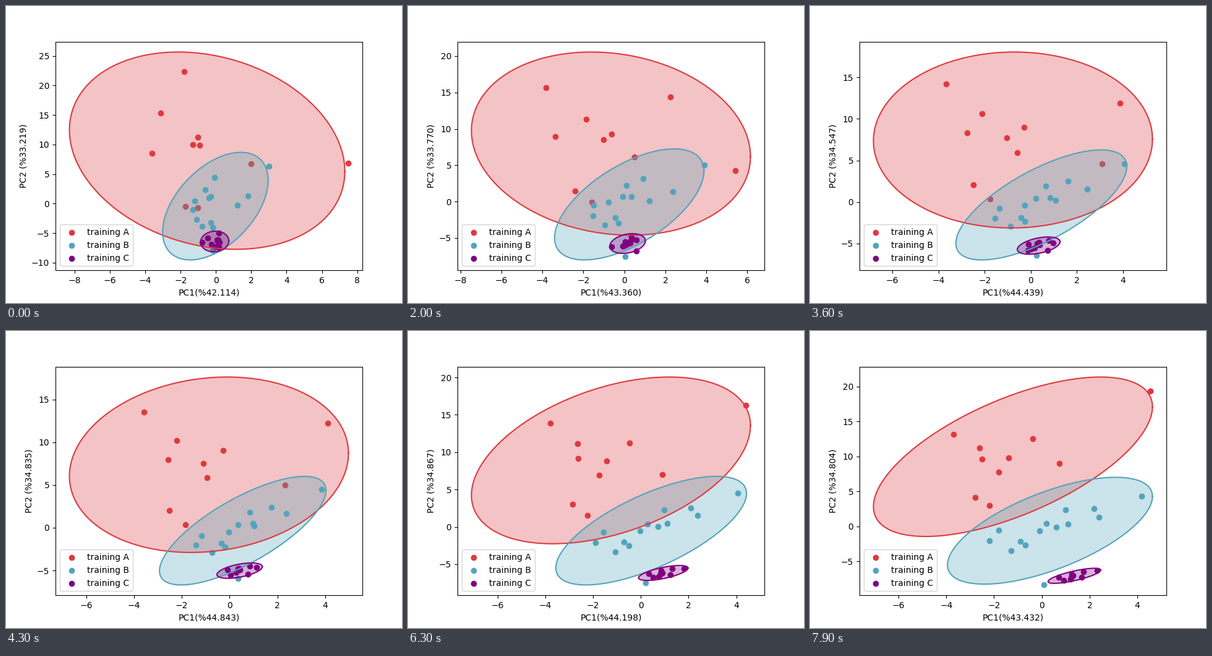
A matplotlib script that plays this animation: 640 px wide and 480 px high, repeating every 8000 ms.

```python
import numpy as np
import matplotlib.pyplot as plt
from matplotlib.animation import FuncAnimation

FRAMES, STEP = 80, 100
SCALE = np.sqrt(5.991)  # 95 % quantile of chi-square, 2 dof
KEYS = np.array([0, 1000, 2900, 4300, 5000, 6300, 7900])


def curve(*values):
    """Straight lines through 3, 4 or 7 values spread over the key times."""
    keys = KEYS[::6 // (len(values) - 1)]
    return lambda ms: np.interp(ms, keys, values)


def whiten(pts):
    """Shift and shear a cloud to zero mean and unit covariance."""
    root = np.linalg.cholesky(np.cov(pts.T))
    return (pts - pts.mean(0)) @ np.linalg.inv(root).T


def morph(start, end):
    """Cloud that glides from one arrangement to another, easing out."""
    start, end = whiten(np.array(start)), whiten(np.array(end))
    return lambda ms: whiten(end + (start - end) * (1 - ms / KEYS[-1]) ** 2)


class Group:
    """A cloud of points kept inside a moving confidence ellipse."""

    def __init__(self, name, color, cloud, x, y, width, height, lean):
        self.name, self.color, self.cloud = name, color, cloud
        self.curves = x, y, width, height, lean

    def draw(self, ax, ms):
        x, y, w, h, lean = (c(ms) for c in self.curves)
        shape = np.array([[w, 0], [h * lean, h * np.sqrt(1 - lean ** 2)]])
        place = lambda unit: (unit @ shape.T + (x, y)).T
        a = np.linspace(0, 2 * np.pi, 200)
        outline = place(np.column_stack([np.cos(a), np.sin(a)]))
        ax.scatter(*place(self.cloud(ms) / SCALE), color=self.color,
                   label=self.name)
        ax.plot(*outline, color=self.color)
        ax.fill(*outline, facecolor=self.color, alpha=0.3)


cloud_a = morph(
    [(-1.8, 22.3), (-3.1, 15.3), (-3.6, 8.5), (-1, 11.2), (-1.3, 10),
     (-0.9, 9.8), (2, 6.6), (7.5, 6.6), (-1.7, -0.5), (-1, -0.7)],
    [(4.5, 19.3), (-3.7, 13.1), (-2.5, 9.6), (-2.6, 11.2), (-0.4, 12.5),
     (-1.4, 9.8), (-1.8, 7.8), (0.7, 9), (-2.8, 4.1), (-2.2, 3)])

cloud_b = morph(
    [(3, 6.3), (-0.1, 4.4), (-0.6, 2.3), (-0.3, 1.2), (-0.4, 1),
     (-1.2, 0.4), (1.2, -0.2), (-1.3, -1), (-1.1, -2.7), (-0.3, -3.1),
     (-0.8, -3.8), (-0.2, -4), (1.8, 1.3), (-0.2, -7.8)],
    [(4.2, 4.3), (2.2, 2.5), (1, 2.4), (1.1, 0.3), (0.2, 0.4),
     (-0.1, -0.6), (0.6, -0.1), (-1.8, -0.5), (-2.2, -2), (-0.9, -2.1),
     (-1.3, -3.5), (-0.7, -2.7), (2.4, 1.3), (0.1, -8.4)])

rng = np.random.default_rng(4)
cloud_c = morph(*rng.uniform(-1, 1, (2, 10, 2)))

groups = [
    Group("training A", "#dd3a3f", cloud_a,
          x=curve(-0.5, -0.62, -0.685, -0.865, -1.2, -1.25, -1.21),
          y=curve(8.96, 8.46, 7.53, 7.38, 7.92, 8.9, 9.94),
          width=curve(7.8, 7.43, 6.25, 5.84, 5.29, 5.84, 5.84),
          height=curve(16.68, 14.47, 10.88, 10.27, 10.64, 11.16, 11.4),
          lean=curve(-0.21, -0.11, 0.25, 0.626)),
    Group("training B", "#53a4bb", cloud_b,
          x=curve(-0.03, 0.55, 0.34),
          y=curve(-0.42, -0.34, -0.64),
          width=curve(2.99, 3.34, 3.92, 3.485, 3.51, 3.99, 4.29),
          height=curve(9.1, 8.47, 6.875, 6.355, 6.4, 7.27, 7.64),
          lean=curve(0.48, 0.74, 0.64)),
    Group("training C", "purple", cloud_c,
          x=curve(-0.07, 0.42, 1.36),
          y=curve(-6.4, -5.02, -7.09),
          width=curve(0.8, 0.95, 1.1),
          height=curve(1.75, 0.9, 1.08),
          lean=curve(0.06, 0.52, 0.76)),
]

share_1 = curve(42.114, 42.611, 44.035, 44.843, 43.751, 44.198, 43.432)
share_2 = curve(33.219, 33.228, 34.258, 34.835, 34.676, 34.867, 34.804)

fig, ax = plt.subplots(figsize=(6.4, 4.8), dpi=100)


def draw(n):
    ms = n * STEP
    ax.clear()
    for group in groups:
        group.draw(ax, ms)
    ax.set_xlabel(f"PC1(%{share_1(ms):.3f})")
    ax.set_ylabel(f"PC2 (%{share_2(ms):.3f})")
    ax.legend(loc="lower left")


anim = FuncAnimation(fig, draw, frames=FRAMES, init_func=lambda: None,
                     interval=STEP, repeat=True, repeat_delay=0)
plt.show()
```
